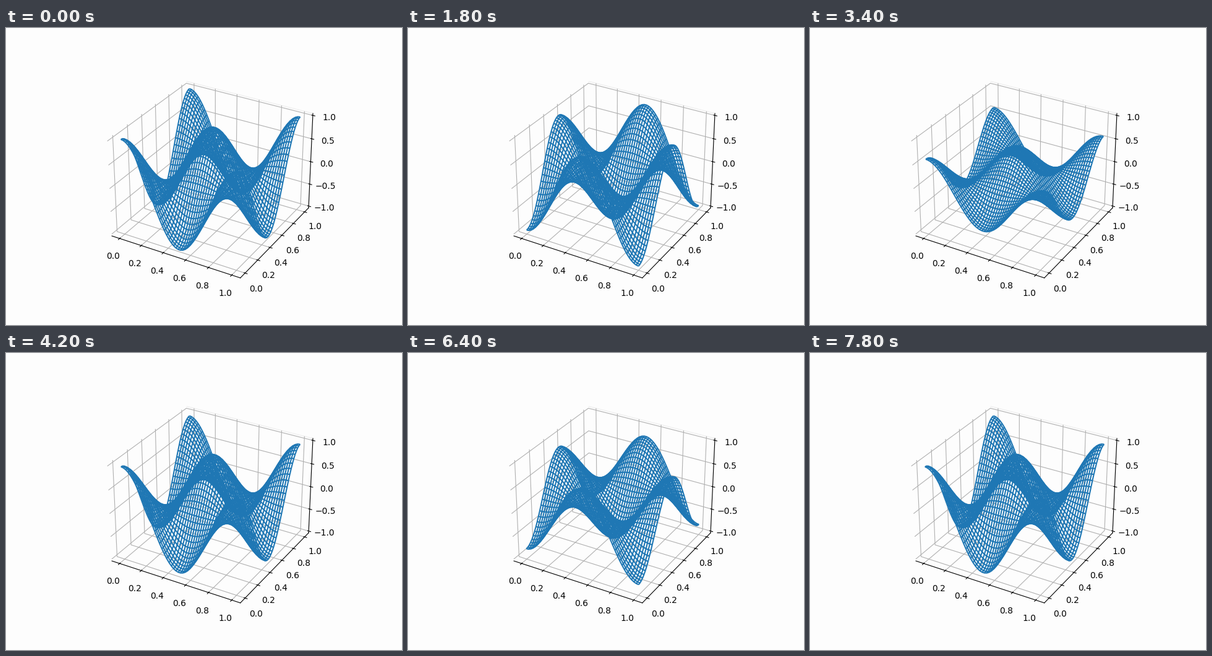
Animation, 640 px wide and 480 px high, one loop 8 s. Source, as a matplotlib script:

```python
import numpy as np
import matplotlib.pyplot as plt
from matplotlib.animation import FuncAnimation

FRAMES = 40
PERIOD = 20          # frames per oscillation
BACK = "#fdfdfd"
EDGE = "#f0f0f0"
MARGIN = 1 / 48      # extra room around each axis


def padded(low, high):
    pad = (high - low) * MARGIN
    return low - pad, high + pad


fig = plt.figure(figsize=(6.4, 4.8), dpi=100, facecolor=BACK)
ax = fig.add_subplot(projection="3d", facecolor=BACK)
ax.set_xlim(*padded(-0.05, 1.05))
ax.set_ylim(*padded(-0.05, 1.05))
ax.set_zlim(*padded(-1, 1))
ax.set_xticks(np.linspace(0, 1, 6))
ax.set_yticks(np.linspace(0, 1, 6))
ax.set_zticks(np.linspace(-1, 1, 5))

for axis, edge in ((ax.xaxis, BACK), (ax.yaxis, EDGE), (ax.zaxis, BACK)):
    axis.pane.set_facecolor(BACK)
    axis.pane.set_edgecolor(edge)
    axis.pane.set_alpha(1)

side = np.linspace(0, 1, 50)
X, Y = np.meshgrid(side, side)
SHAPE = np.cos(2 * np.pi * X) * np.cos(2 * np.pi * Y)
wires = []


def update(frame):
    while wires:
        wires.pop().remove()
    swing = np.cos(2 * np.pi * frame / PERIOD)
    wires.append(ax.plot_wireframe(X, Y, SHAPE * swing, color="C0", linewidth=1.5))
    return wires


anim = FuncAnimation(fig, update, frames=FRAMES, interval=200,
                     repeat=True, repeat_delay=0, blit=False)
plt.show()
```
